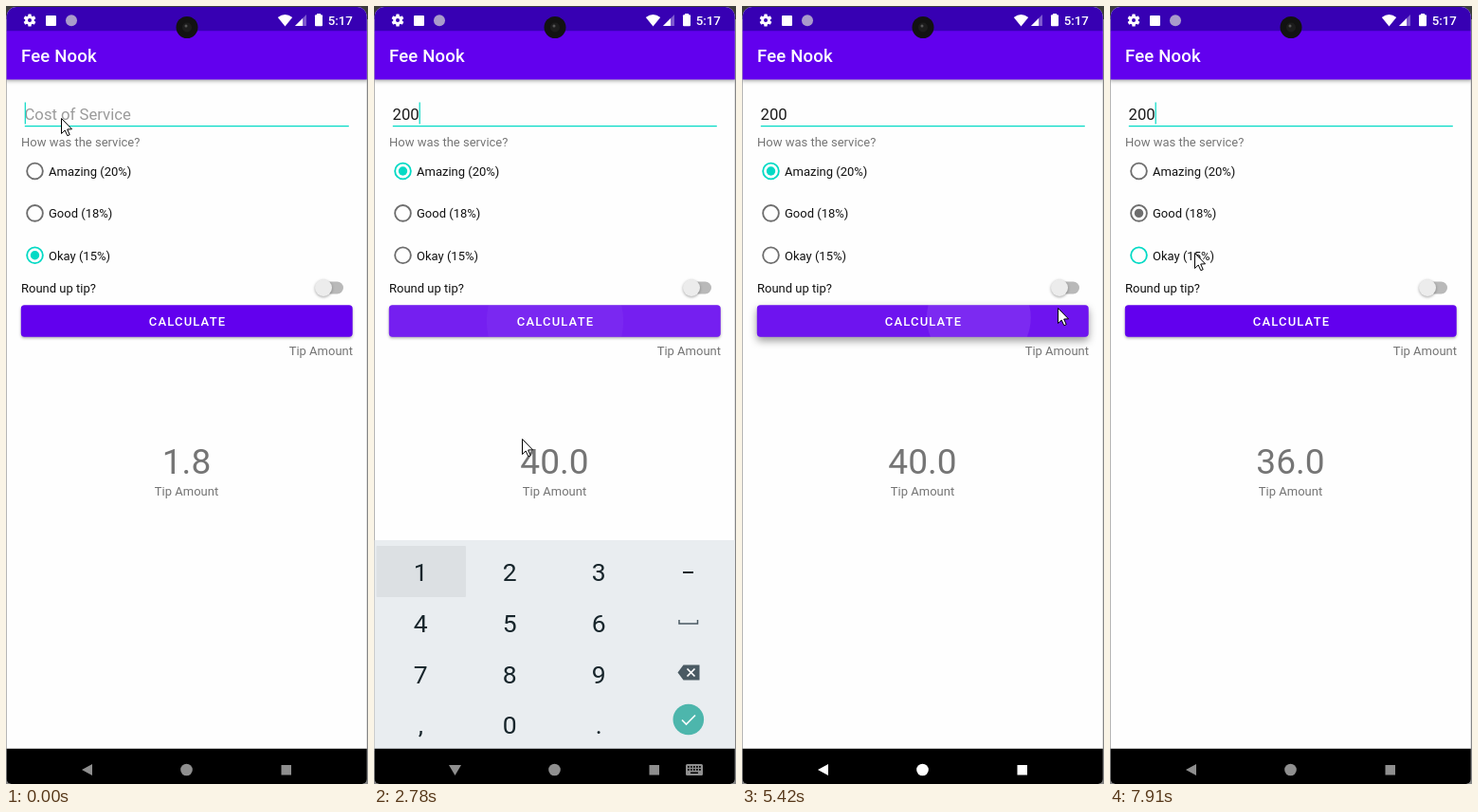
Recreate the animation shown at these times as an HTML page with a canvas. Size 382 px wide and 820 px high, loop 8000 ms.

```html
<!DOCTYPE html>
<html lang="en">
<head>
<meta charset="utf-8">
<title>Fee Nook</title>
<style>
html, body { margin: 0; width: 100%; height: 100%; overflow: hidden; background: #858585; }
canvas { display: block; width: 382px; height: 820px; }
</style>
</head>
<body>
<canvas id="stage" width="382" height="820"></canvas>
<script>
const c = document.getElementById('stage').getContext('2d');
const LOOP = 8000;
const PURPLE = '#6200ee', TEAL = '#03dac5', GREY = '#757575', INK = '#17252b', KEY = '#4a5a63';
const BILL = 200, RATES = [20, 18, 15];
const LABELS = ['Amazing', 'Good', 'Okay'];

// Pointer moves: start, end, x, y
const MOVES = [
  [0, 1, 58, 118],
  [1180, 1480, 104, 170],
  [1850, 2250, 165, 326],
  [2640, 2780, 156, 456],
  [2780, 3170, 83, 799],
  [3980, 4650, 221, 331],
  [4650, 4930, 333, 318],
  [5420, 5840, 114, 229],
  [5900, 6120, 104, 217],
  [6300, 6770, 175, 319],
  [7450, 7910, 89, 260],
];
const PRESSES = [2390, 5190, 6910];
const PRESS_TIME = 630, ANSWER_DELAY = 240;
const PICKS = [{ at: -9999, row: 2 }, { at: 1630, row: 0 }, { at: 6270, row: 1 }, { at: 7900, row: 2 }];

const clamp = v => Math.max(0, Math.min(1, v));
const part = (t, a, b) => clamp((t - a) / (b - a));
const mix = (a, b, p) => a + (b - a) * p;
const smooth = p => p * p * (3 - 2 * p);
const white = a => `rgba(255,255,255,${a})`;
const lastBefore = (t, picks = PICKS) => picks.findLastIndex(p => t >= p.at);

function box(x, y, w, h, color, r = 0) {
  c.fillStyle = color;
  c.beginPath();
  c.roundRect(x, y, w, h, r);
  c.fill();
}

function disc(x, y, r, color) {
  c.fillStyle = color;
  c.beginPath();
  c.arc(x, y, r, 0, 7);
  c.fill();
}

function poly(points, color) {
  c.fillStyle = color;
  c.beginPath();
  points.forEach(([x, y]) => c.lineTo(x, y));
  c.closePath();
  c.fill();
}

function line(points, color, width) {
  c.strokeStyle = color;
  c.lineWidth = width;
  c.beginPath();
  points.forEach(([x, y]) => c.lineTo(x, y));
  c.stroke();
}

function text(s, x, y, size, color, align = 'left', weight = 400, gap = 0) {
  c.font = `${weight} ${size}px Roboto, sans-serif`;
  c.letterSpacing = gap + 'px';
  c.textAlign = align;
  c.fillStyle = color;
  c.fillText(s, x, y);
}

function shadow(alpha, blur, dy, draw) {
  c.save();
  c.shadowColor = `rgba(0,0,0,${alpha})`;
  c.shadowBlur = blur;
  c.shadowOffsetY = dy;
  draw();
  c.restore();
}

function gear(x, y) {
  c.save();
  c.translate(x, y);
  for (let i = 0; i < 6; i++) {
    box(-1.7, -6.5, 3.4, 4, '#fff', 0.6);
    c.rotate(Math.PI / 3);
  }
  c.restore();
  disc(x, y, 4.8, '#fff');
  disc(x, y, 2, '#3700b3');
}

function header() {
  shadow(0.35, 4, 1.5, () => box(0, 26, 382, 51.4, PURPLE));
  box(0, 0, 382, 26.3, '#3700b3');
  gear(25, 15);
  box(42, 10, 11, 11, '#fff', 1);
  disc(69, 15.2, 6, '#a99bcb');
  c.fillStyle = '#fff';
  c.beginPath();
  c.moveTo(294.5, 21.5);
  c.lineTo(286.8, 12);
  c.quadraticCurveTo(294.5, 6, 302.2, 12);
  c.fill();
  poly([[305, 21], [317, 21], [317, 9]], white(0.35));
  poly([[305, 21], [313, 21], [313, 13]], '#fff');
  box(326, 9.3, 8, 12, '#fff', 1);
  box(328, 8, 4, 2, '#fff');
  text('5:17', 339.7, 20, 13.3, '#fff', 'left', 500);
  text('Fee Nook', 16, 59, 18.5, '#fff', 'left', 500, 0.2);
  disc(191, 22.5, 11.5, '#121212');
  disc(191, 22.5, 5, '#1c1c1c');
  disc(190, 21, 1.5, '#555');
}

function field(t) {
  const count = clamp(Math.floor((t - 380) / 120) / 3) * 3;
  if (count) text(String(BILL).slice(0, count), 19.5, 119.5, 16.7, '#1b1b1b');
  else text('Cost of Service', 19.5, 119.5, 16.7, '#9b9b9b');
  box(19.8, 126.1, 342, 1.2, TEAL);
  const on = t < 1120 || (t - 1120) % 1000 >= 500;
  if (on) box(19.7 + count * 9.3, 101.5, 1.2, 23, TEAL);
  text('How was the service?', 16, 148, 13, GREY);
}

function radios(t) {
  const n = lastBefore(t);
  const { at, row } = PICKS[n];
  const filled = t - at < 110 ? PICKS[n - 1].row : row;
  LABELS.forEach((label, i) => {
    const y = 174 + i * 44.4;
    const color = i === row ? TEAL : '#6e6e6e';
    const wave = (t - at - 100) / 500;
    if (i === row && wave > 0 && wave < 1) {
      disc(30.5, y, mix(13, 17, wave), `rgba(3,218,197,${0.2 * (1 - wave)})`);
    }
    c.strokeStyle = color;
    c.lineWidth = 1.85;
    c.beginPath();
    c.arc(30.5, y, 8.35, 0, 7);
    c.stroke();
    if (i === filled) disc(30.5, y, 4.7, color);
    text(`${label} (${RATES[i]}%)`, 45, y + 4.8, 13, '#111');
  });
}

function toggle() {
  text('Round up tip?', 16, 302, 13, '#111');
  box(330, 290.5, 26, 13, '#b9b9b9', 6.5);
  shadow(0.35, 3, 1, () => disc(335, 297, 9, '#ececec'));
}

function button(t) {
  const shape = [15.8, 315.2, 349.9, 33.5];
  const start = PRESSES.find(s => t >= s && t < s + PRESS_TIME);
  const p = start ? (t - start) / PRESS_TIME : 1;
  const raised = p < 0.4;
  shadow(raised ? 0.4 : 0.3, raised ? 8 : 3, raised ? 4 : 1.5, () => box(...shape, PURPLE, 3.7));
  if (start) {
    const fade = 1 - part(p, 0.65, 1);
    const move = clamp(p / 0.62);
    const from = pointerAt(start);
    c.save();
    c.beginPath();
    c.roundRect(...shape, 3.7);
    c.clip();
    box(...shape, white(mix(0.02, 0.12, move) * fade));
    disc(mix(from.x + 2, 191, move), mix(from.y + 5, 332, move), 30 + 68 * p,
      white(mix(0.17, 0.04, move) * fade));
    c.restore();
  }
  text('CALCULATE', 191.5, 337, 13, '#fff', 'center', 500, 1.16);
}

function result(t) {
  const asked = PRESSES.findLast(s => t >= s + ANSWER_DELAY);
  const tip = asked ? BILL * RATES[PICKS[lastBefore(asked)].row] / 100 : 1.8;
  text('Tip Amount', 366, 368, 13, GREY, 'right');
  text(tip.toFixed(1), 190.5, 492.8, 37.1, GREY, 'center');
  text('Tip Amount', 190.5, 516, 13, GREY, 'center');
}

function keyboard(up) {
  if (up <= 0) return;
  c.save();
  c.translate(0, (1 - up) * 220);
  box(0, 563, 382, 222, '#e9edf0');
  box(2.5, 569, 94.5, 54, '#dce0e3', 1);
  ['123', '456', '789', ',0.'].forEach((row, j) => {
    [...row].forEach((key, i) => text(key, 49.3 + i * 94, 606.3 + j * 53.7, 26.5, INK, 'center'));
  });
  box(326, 596, 11, 2, INK);
  line([[322, 647], [322, 651], [341.5, 651], [341.5, 647]], KEY, 1.5);
  poly([[320.5, 702.5], [326.5, 694.5], [343.5, 694.5], [343.5, 710.5], [326.5, 710.5]], KEY);
  for (const d of [4, -4]) line([[330.5, 702.5 - d], [338.5, 702.5 + d]], '#fff', 1.7);
  disc(331.8, 752, 16.3, '#4db6ac');
  line([[325, 752.5], [329.5, 757], [339, 747.5]], '#fff', 1.7);
  c.restore();
}

function navBar(t, open) {
  box(0, 782.8, 382, 38, '#000');
  const lit = part(t, 3290, 3420) * (1 - part(t, 5940, 6400));
  const v = Math.round(mix(143, 255, lit));
  const color = `rgb(${v},${v},${v})`;
  if (open) poly([[79, 800], [92, 800], [85.5, 811]], color);
  else poly([[80, 805], [91, 799], [91, 811]], color);
  disc(190.5, 805, 6.3, color);
  box(290.5, 800, 10.5, 10.5, color);
  if (!open) return;
  box(329, 799, 18, 12, color, 1.5);
  for (let i = 0; i < 10; i++) {
    box(331 + i % 5 * 3, i < 5 ? 801 : 804, 1.8, 1.8, '#000');
  }
  box(334, 807.5, 8, 1.6, '#000');
}

function pointerAt(t) {
  const i = MOVES.findLastIndex(m => t >= m[0]);
  const [start, end, x, y] = MOVES[i];
  const from = MOVES[Math.max(0, i - 1)];
  const p = smooth(part(t, start, end));
  return { x: Math.round(mix(from[2], x, p)), y: Math.round(mix(from[3], y, p)) };
}

function pointer(t) {
  const { x, y } = pointerAt(t);
  c.save();
  c.translate(x + 0.5, y + 0.5);
  poly([[0, 0], [0, 16], [3.7, 12.5], [6.3, 18.2], [8.7, 17.2], [6.2, 11.5], [11, 11.3]], '#fff');
  c.strokeStyle = '#000';
  c.lineWidth = 1;
  c.stroke();
  c.restore();
}

function draw(t) {
  const up = t < 2000 ? 1 - (1 - part(t, 200, 490)) ** 2 : 1 - part(t, 3380, 3760) ** 2;
  box(0, 0, 382, 820, '#858585');
  box(0, 0, 382, 14, '#3c3c3c');
  c.save();
  c.beginPath();
  c.roundRect(0.6, 1, 380.2, 819, [10, 10, 5, 5]);
  c.clip();
  box(0, 0, 382, 820, '#fefefe');
  header();
  field(t);
  radios(t);
  toggle();
  button(t);
  result(t);
  keyboard(up);
  navBar(t, up > 0.05);
  c.restore();
  pointer(t);
}

const begin = performance.now();
function frame() {
  draw((performance.now() - begin) % LOOP);
  requestAnimationFrame(frame);
}
draw(0);
requestAnimationFrame(frame);
</script>
</body>
</html>
```
